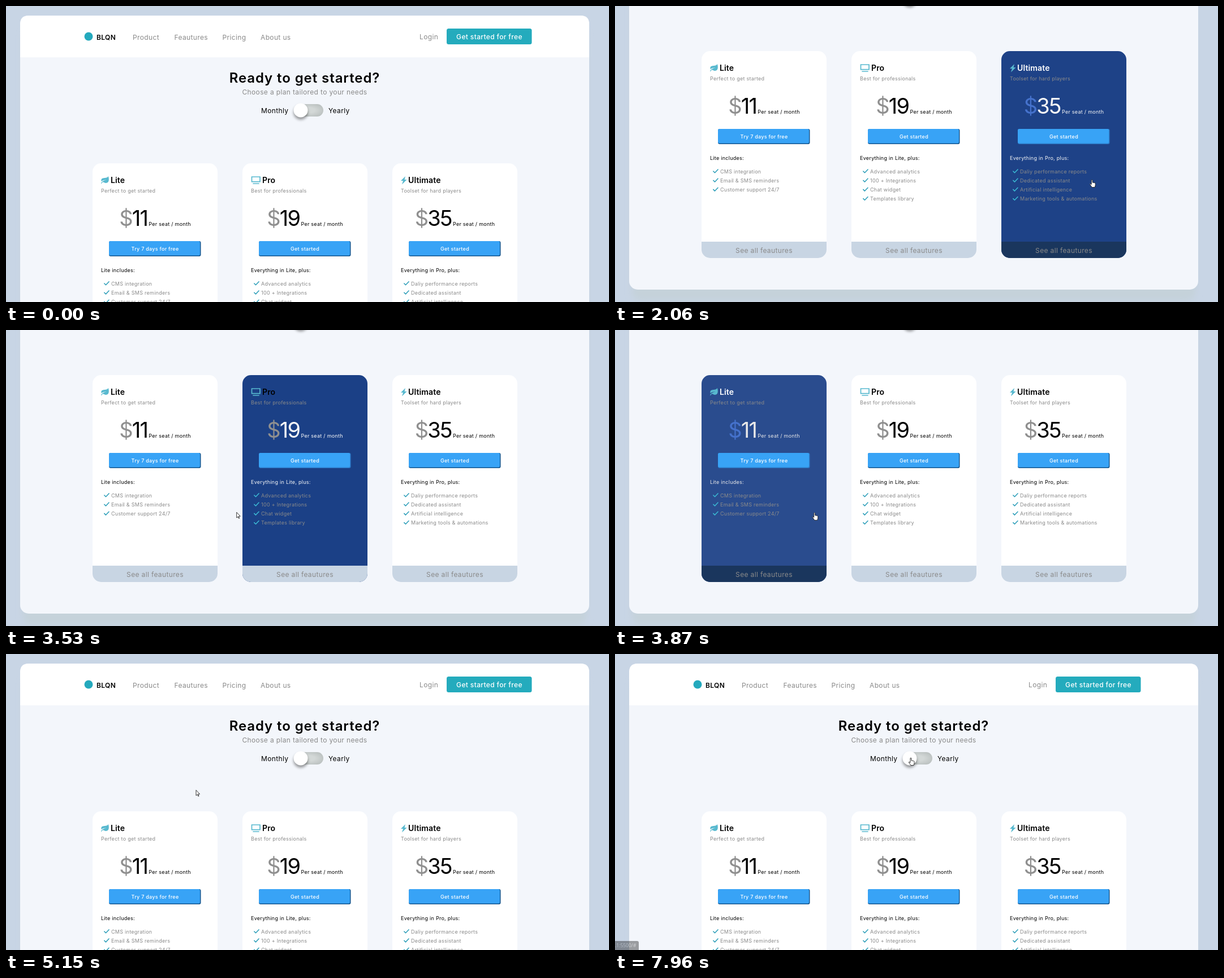
Animation of 1066 by 525 pixels, one loop 8 s. Source, as an HTML page:

```html
<!DOCTYPE html>
<html lang="en">
<head>
<meta charset="utf-8">
<title>Pricing page</title>
<style>
  html, body { margin: 0; width: 100%; height: 100%; overflow: hidden; background: #c8d5e5; }
  svg { display: block; width: 1066px; height: 525px; }
  text { font: 400 12px Inter, "Open Sans", sans-serif; letter-spacing: .03em; white-space: pre; }
  .mid { text-anchor: middle; }
  .gray { fill: #8a8a8a; }
  .white { fill: #fff; font-weight: 500; }
  .small { font-size: 9px; letter-spacing: .03em; }
  .bold { font-weight: 600; }
  .h1 { font-size: 24px; font-weight: 600; letter-spacing: .038em; }
  .h2 { font-size: 14px; font-weight: 600; letter-spacing: .01em; }
  .price { font-size: 38px; letter-spacing: -.045em; }
  .link, .card { --p: 0%; }
  .link { fill: color-mix(in srgb, #000 var(--p), #8a8a8a); }
  .face { fill: color-mix(in srgb, #163b83 var(--p), #fff); }
  .ink { fill: color-mix(in srgb, #fff var(--p), #000); }
  .edge { fill: color-mix(in srgb, #2f7fce var(--p), #17578f); }
  .check { fill: none; stroke: color-mix(in srgb, #3cbcd6 var(--p), #2a9db8); stroke-width: 1.5; stroke-linecap: round; stroke-linejoin: round; }
  .icon { fill: #58b9cf; }
  .screen { fill: none; stroke: #58b9cf; stroke-width: 1.7; stroke-linecap: round; }
  .foot { fill: #c8d5e3; }
  .sign { fill: #8f8f8f; }
  .on .foot { fill: #1a365d; }
  .on .sign { fill: #4572cc; }
  .on .h2 { fill: #fff; }
  .tip { font: 8.5px "Open Sans", sans-serif; letter-spacing: 0; fill: #a2a2a2; }
  .pointer { fill: #fff; stroke: #222; stroke-width: .9; stroke-linejoin: round; }
</style>
</head>
<body>
<svg viewBox="0 0 1066 525">
  <defs>
    <radialGradient id="track" r=".6"><stop offset=".35" stop-color="#d3d8d7"/><stop offset="1" stop-color="#b9bfbe"/></radialGradient>
    <filter id="soft" x="-50%" y="-50%" width="200%" height="200%"><feGaussianBlur stdDeviation="2.6"/></filter>
    <filter id="wide"><feGaussianBlur stdDeviation="6"/></filter>
    <clipPath id="round"><rect y="279" width="221" height="367" rx="15"/></clipPath>
  </defs>
  <g id="page"></g>
  <g id="status">
    <path d="M0 509H39q3 0 3 3V525H0z" fill="#161616"/>
    <text class="tip" x="0" y="520">.1:5500/#</text>
  </g>
  <g id="cursor">
    <path id="arrow" class="pointer" d="M.5 .3V10L3 8L4 11H5.500L4.300 7.300H7z"/>
    <path id="hand" class="pointer" d="M-1 1Q0-1 1 1V5L4.500 5.500Q6 5.500 6 7V10L5 13.500H0L-3.800 8Q-3.500 6.500-1 8.500z"/>
  </g>
</svg>
<script>
const LOOP = 8000, FADE = 300, LAG = 32, DEPTH = 199;
const CARD_X = 153, CARD_GAP = 265;

const $ = id => document.getElementById(id);
const text = (x, y, cls, s) => `<text x="${x}" y="${y}" class="${cls}">${s}</text>`;

const icons = {
  leaf: '<path class="icon" d="M28 302Q31 314 23 314L18 312L16 315H15Q16 310 24 308.500Q19 308 15.500 311Q14 305 21 305Q26 305 28 302z"/>',
  screen: '<path class="screen" d="M16.500 303H31V311.700H16.500zM19 315H29"/>',
  bolt: '<path class="icon" d="M23 302L15 310H19L17 316.500L25.500 308H21.500z"/>'
};

const plans = [
  { icon: 'leaf', nameX: 32, name: 'Lite', sub: 'Perfect to get started', cost: 11,
    action: 'Try 7 days for free', head: 'Lite includes:',
    items: ['CMS integration', 'Email &amp; SMS reminders', 'Customer support 24/7'] },
  { icon: 'screen', nameX: 35, name: 'Pro', sub: 'Best for professionals', cost: 19,
    action: 'Get started', head: 'Everything in Lite, plus:',
    items: ['Advanced analytics', '100 + Integrations', 'Chat widget', 'Templates library'] },
  { icon: 'bolt', nameX: 28, name: 'Ultimate', sub: 'Toolset for hard players', cost: 35,
    action: 'Get started', head: 'Everything in Pro, plus:',
    items: ['Daliy performance reports', 'Dedicated assistant', 'Artificial intelligence', 'Marketing tools &amp; automations'] }
];

const row = (s, i) => {
  const y = 492 + i * 16.2;
  return `<path class="check" d="M20.800 ${y}l2.700 2.700l5.500-5.800"/>` + text(33, y + 3.6, 'small gray', s);
};

const price = cost => `<tspan class="sign">$</tspan><tspan class="ink">${cost}</tspan>`
  + '<tspan class="small ink" dx="2">Per seat / month</tspan>';

const card = (p, i) => `<g class="card" transform="translate(${CARD_X + i * CARD_GAP})">
  <g clip-path="url(#round)"><path class="face" d="M0 279H221V646H0z"/><path class="foot" d="M0 617H221V646H0z"/></g>
  ${icons[p.icon]}
  ${text(p.nameX, 314, 'h2', p.name)}
  ${text(15, 331, 'small gray', p.sub)}
  ${text(110.5, 390, 'price mid', price(p.cost))}
  <rect class="edge" x="29" y="417" width="162.500" height="27" rx="3"/>
  <rect x="29" y="417" width="161" height="25.500" rx="2.500" fill="#38a3f6"/>
  ${text(110.5, 434, 'small white mid', p.action)}
  ${text(15, 472, 'small ink', p.head)}
  ${p.items.map(row).join('')}
  ${text(110.5, 636.5, 'gray mid', 'See all feautures')}
</g>`;

const links = { Product: 224, Feautures: 297.5, Pricing: 382.5, 'About us': 450 };

$('page').innerHTML = `
  <rect x="30" y="40" width="996" height="682" rx="15" fill="#c5d2da" filter="url(#wide)"/>
  <rect x="25" y="17" width="1006" height="685" rx="15" fill="#f3f6fb"/>
  <path d="M25 91V32Q25 17 40 17H1016Q1031 17 1031 32V91z" fill="#fff"/>
  <circle cx="146" cy="54" r="7.500" fill="#24a9bd"/>
  ${text(160, 60, 'bold', 'BLQN')}
  ${Object.entries(links).map(([s, x]) => text(x, 60, 'link', s)).join('')}
  ${text(731, 59, 'gray', 'Login')}
  <rect x="779" y="40" width="150.500" height="28" rx="3.500" fill="#24abbd"/>
  ${text(854.5, 58.5, 'white mid', 'Get started for free')}
  ${text(528, 136, 'h1 mid', 'Ready to get started?')}
  ${text(528, 157, 'gray mid', 'Choose a plan tailored to your needs')}
  ${text(451, 189.5, '', 'Monthly')}
  ${text(570, 189.5, '', 'Yearly')}
  <rect id="toggle" x="509" y="174" width="52" height="22" rx="11" fill="url(#track)"/>
  <circle cx="521" cy="189" r="12.500" opacity=".4" filter="url(#soft)"/>
  <circle cx="521" cy="185" r="12.500" fill="#fff"/>
  ${plans.map(card).join('')}`;

// pointer key points: time, x, y
const path = [
  [360, 934, 540], [1050, 924, 200], [1320, 923, 197], [1900, 900, 285], [2060, 843.5, 308],
  [2690, 682, 325], [2800, 638, 322], [3530, 407.5, 323], [3640, 374, 323], [4210, 321.5, 325],
  [4550, 321.5, 325], [4730, 326, 278], [5220, 337, 235], [5850, 240, 56], [6310, 340.5, 55],
  [7400, 488, 56], [7540, 500, 66], [7630, 513, 143], [7960, 523, 184]
];

const span = (t, a, d) => Math.min(1, Math.max(0, (t - a) / d));
const ease = p => 1 - (1 - p) ** 2.35;
const inOut = p => p < .5 ? 4 * p ** 3 : 1 - 4 * (1 - p) ** 3;
const scrollAt = t => DEPTH * (inOut(span(t, 1085, 260)) - inOut(span(t, 4380, 218)));

function pointAt(t) {
  const next = path.findIndex(p => p[0] > t);
  if (next < 1) return path.at(next).slice(1);
  const [t0, x0, y0] = path[next - 1], [t1, x1, y1] = path[next];
  const k = (t - t0) / (t1 - t0);
  return [x0 + (x1 - x0) * k, y0 + (y1 - y0) * k];
}

// When the pointer enters and leaves an element, found by following its path
function visit(el) {
  const box = el.getBoundingClientRect();
  const times = [];
  for (let t = 0; t < LOOP; t += 4) {
    const [x, y] = pointAt(t), top = y + scrollAt(t);
    if (x > box.left && x < box.right && top > box.top && top < box.bottom) times.push(t + LAG);
  }
  return { el, from: times[0], to: times.at(-1) };
}

const visits = [...document.querySelectorAll('.card, .link, #toggle')].map(visit);

function draw(t) {
  $('page').setAttribute('transform', `translate(0 ${-scrollAt(t).toFixed(1)})`);

  let over = false;
  for (const { el, from, to } of visits) {
    const on = t >= from && t < to;
    const k = ease(span(t, from, FADE)) - ease(span(t, to, FADE));
    over ||= on;
    el.style.setProperty('--p', (k * 100).toFixed(1) + '%');
    el.classList.toggle('on', on);
  }

  const [x, y] = pointAt(t);
  $('cursor').setAttribute('transform', `translate(${x.toFixed(1)} ${y.toFixed(1)})`);
  $('hand').style.display = over ? '' : 'none';
  $('arrow').style.display = over ? 'none' : '';
  $('status').style.opacity = span(t, 5850, 120) - span(t, 7840, 200);
}

const start = performance.now();
function tick() {
  draw((performance.now() - start) % LOOP);
  requestAnimationFrame(tick);
}
draw(0);
requestAnimationFrame(tick);
</script>
</body>
</html>
```
